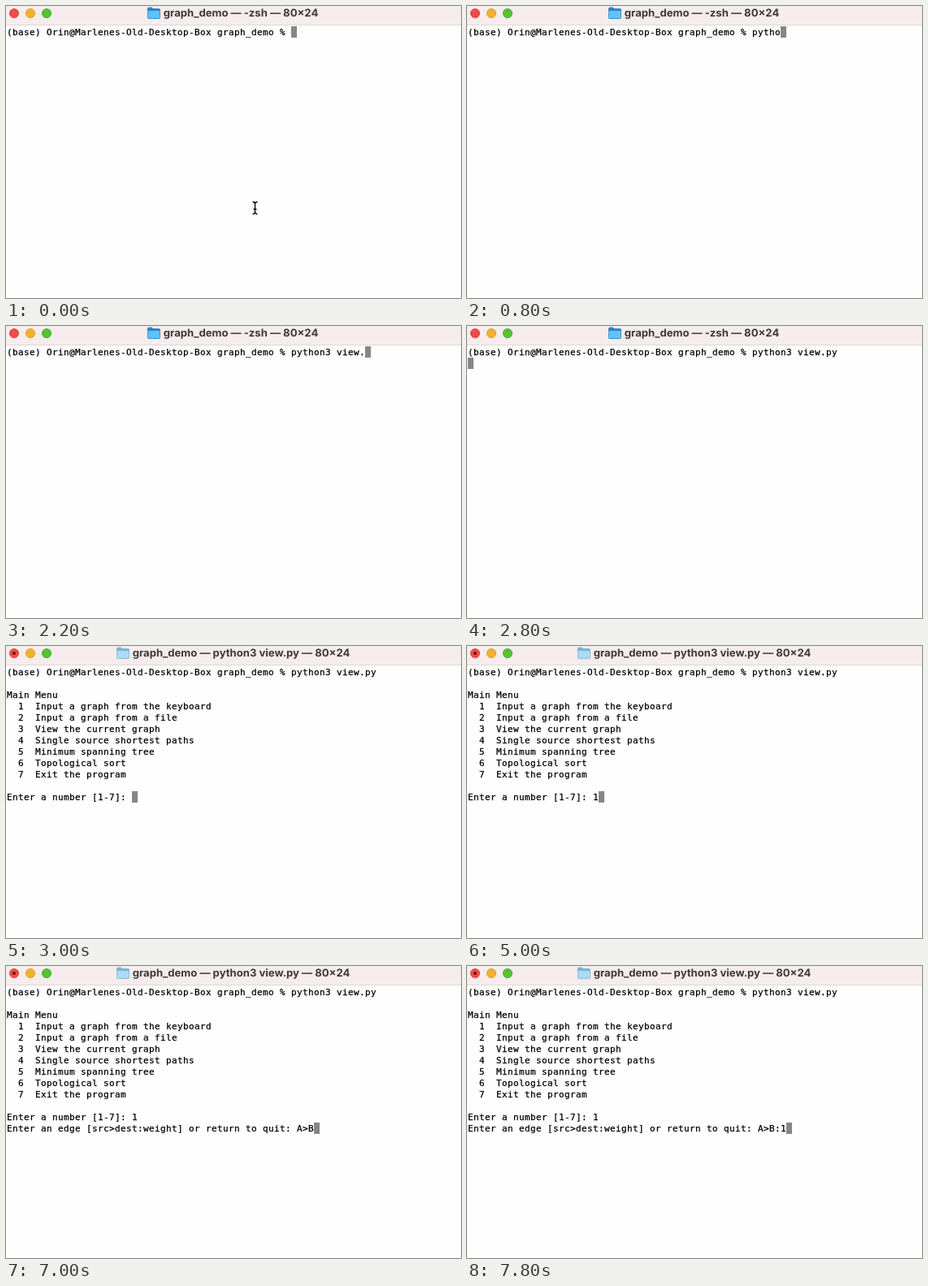
An HTML page for the animation above (8 s loop, 560x360 px).

```html
<!DOCTYPE html>
<html lang="en">
<head>
<meta charset="utf-8">
<title>Terminal session</title>
<style>
  html, body { margin: 0; width: 100%; height: 100%; overflow: hidden; background: #fefefe; }
  svg { display: block; }
  #title { font: 700 13.1px Inter, sans-serif; fill: #3d3939; text-anchor: middle; text-rendering: geometricPrecision; }
  #screen { font: 11px "DejaVu Sans Mono", monospace; fill: #000; stroke: #000; stroke-width: .25px; }
  #screen text { white-space: pre; }
</style>
</head>
<body>
<svg width="560" height="360" viewBox="0 0 560 360" xml:space="preserve">
  <rect width="560" height="360" fill="#fefefe"/>
  <rect width="560" height="23" fill="#f7ecec"/>
  <rect y="23" width="560" height="1" fill="#e0d8d8"/>
  <g stroke-width=".8">
    <circle cx="10" cy="9" r="5.6" fill="#ed4c48" stroke="#d2403d"/>
    <circle cx="30" cy="9" r="5.6" fill="#f4b02f" stroke="#d69728"/>
    <circle cx="50" cy="9" r="5.6" fill="#55c231" stroke="#43a327"/>
  </g>
  <circle id="busyDot" cx="10" cy="9" r="2" fill="#6f100e"/>
  <g id="folder">
    <path id="folderBack" d="M0 2q0-2 2-2h3.500l1.500 1.500h7q2 0 2 2v9q0 2-2 2h-12q-2 0-2-2z"/>
    <path id="folderFront" d="M.7 4.500h14.600v8q0 1.300-1.300 1.300h-12q-1.300 0-1.300-1.300z"/>
  </g>
  <text id="title" y="13"></text>
  <rect id="cursor" width="7" height="14" fill="#868686"/>
  <g id="screen"></g>
  <path id="pointer" d="M303.500 241.500q3 0 3 2.500v10q0 2.500-3 2.500M309.500 241.500q-3 0-3 2.500v10q0 2.500 3 2.500M304.500 250.500h4"
        fill="none" stroke="#000" stroke-width="1.3"/>
</svg>
<script>
const LOOP = 8000, CELL = 7, LINE = 14, LEFT = 1, TOP = 25;
const PROMPT = "(base) Orin@Marlenes-Old-Desktop-Box graph_demo % ";
const MENU = ["Input a graph from the keyboard", "Input a graph from a file",
  "View the current graph", "Single source shortest paths", "Minimum spanning tree",
  "Topological sort", "Exit the program"];

// Each pair is [time in ms, characters typed so far].
const COMMAND_KEYS = [[400, 1], [600, 2], [800, 5], [1000, 6], [1200, 7],
  [1800, 9], [2000, 11], [2200, 13], [2400, 14], [2600, 15]];
const EDGE_KEYS = [[6400, 1], [6600, 2], [7000, 3], [7400, 4], [7800, 5]];

const el = id => document.getElementById(id);
const set = (node, attrs) => {
  for (const name in attrs) node.setAttribute(name, attrs[name]);
};

function typed(text, keys, t) {
  const count = keys.reduce((n, [time, length]) => t >= time ? length : n, 0);
  return text.slice(0, count);
}

function terminalLines(t) {
  const lines = [PROMPT + typed("python3 view.py", COMMAND_KEYS, t)];
  if (t >= 2800) lines.push("");
  if (t >= 3000) {
    lines.push("Main Menu", ...MENU.map((item, i) => `  ${i + 1}  ${item}`), "",
      "Enter a number [1-7]: " + (t >= 5000 ? "1" : ""));
  }
  if (t >= 5400) {
    lines.push("Enter an edge [src>dest:weight] or return to quit: " +
      typed("A>B:1", EDGE_KEYS, t));
  }
  return lines;
}

function drawLine(text, row) {
  const node = document.createElementNS("http://www.w3.org/2000/svg", "text");
  node.textContent = text;
  set(node, {
    x: [...text].map((_, col) => LEFT + col * CELL).join(" "),
    y: TOP + row * LINE + 11
  });
  return node;
}

let shown = "";
function render(t) {
  const lines = terminalLines(t), running = t >= 3000;
  el("pointer").style.display = t < 400 ? "" : "none";
  const content = lines.join("\n");
  if (content === shown) return;
  shown = content;

  el("screen").replaceChildren(...lines.map(drawLine));
  const last = lines.length - 1;
  set(el("cursor"), { x: LEFT + lines[last].length * CELL, y: TOP + last * LINE });

  el("title").textContent = `graph_demo — ${running ? "python3 view.py" : "-zsh"} — 80×24`;
  set(el("title"), { x: running ? 289.5 : 289 });
  set(el("folder"), { transform: `translate(${running ? 136 : 174} 1.5)` });
  set(el("folderBack"), { fill: running ? "#7fb3d0" : "#2b86bd" });
  set(el("folderFront"), { fill: running ? "#a9dbf5" : "#62c1f6" });
  el("busyDot").style.display = running ? "" : "none";
}

const start = performance.now();
function tick() {
  render((performance.now() - start) % LOOP);
  requestAnimationFrame(tick);
}
tick();
</script>
</body>
</html>
```
